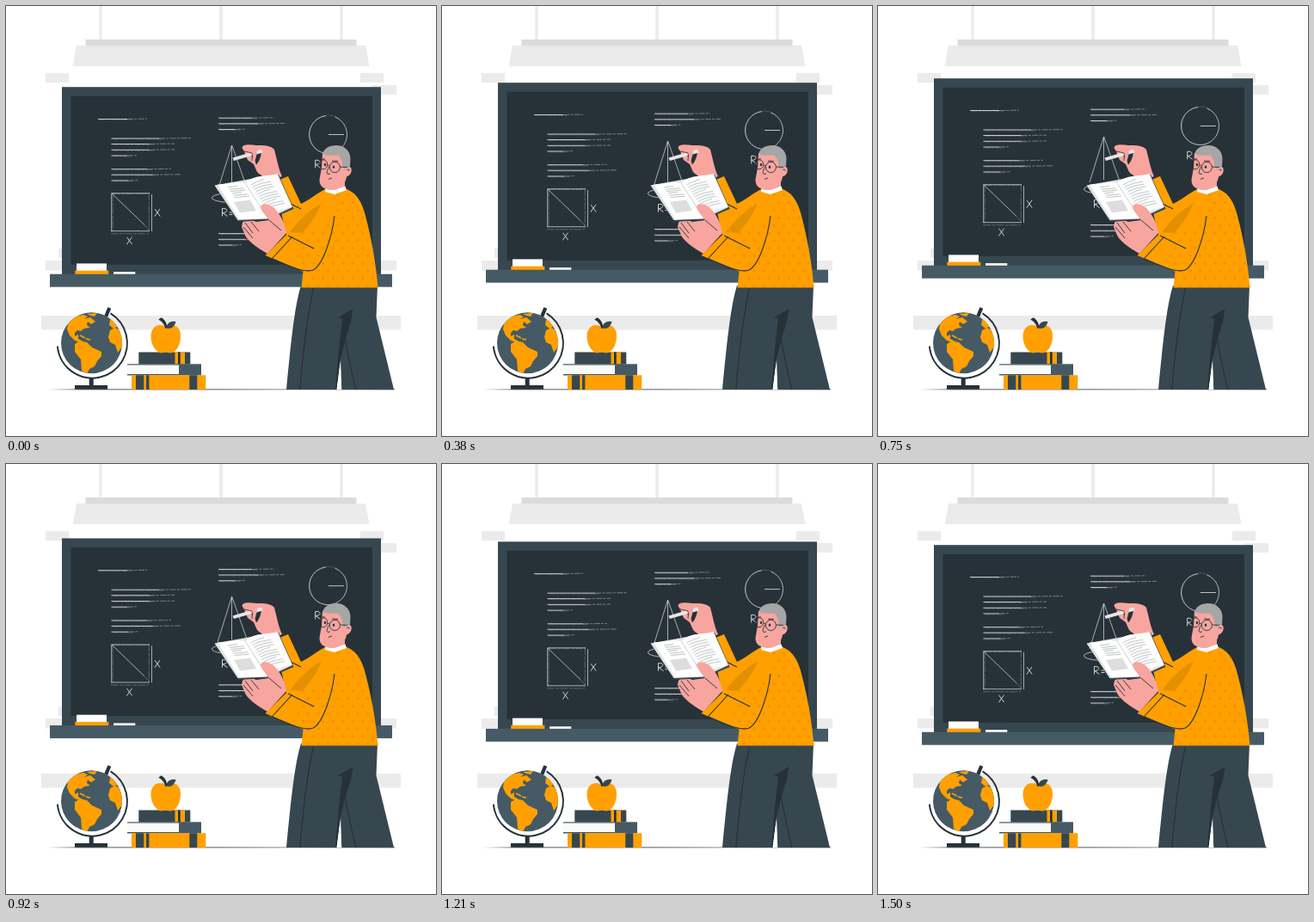
Write an HTML page with a canvas that moves like this. It is 500x500 px and loops after 1540 ms.

```html
<!DOCTYPE html>
<html lang="en">
<head>
<meta charset="utf-8">
<title>Mathematics lesson</title>
<style>
  html, body { margin: 0; width: 100%; height: 100%; overflow: hidden; background: #fff; }
  canvas { display: block; width: 500px; height: 500px; }
</style>
</head>
<body>
<canvas id="stage" width="500" height="500"></canvas>
<script>
const ctx = document.getElementById('stage').getContext('2d');
const INK = '#263238', SLATE = '#37474f', STEEL = '#455a64', ORANGE = '#ffa000';
const SKIN = '#f8a59f', WALL = '#ebebeb', CHALK = '#d0d5d7';
const LOOP = 1540, FPS = 24, CYCLE = 1.5, LIFT = 10;

function box(color, x, y, w, h) {
  ctx.fillStyle = color;
  ctx.fillRect(x, y, w, h);
}
function fill(color, d) {
  ctx.fillStyle = color;
  ctx.fill(new Path2D(d));
}
function line(color, width, d) {
  ctx.strokeStyle = color;
  ctx.lineWidth = width;
  ctx.stroke(new Path2D(d));
}
function disc(color, x, y, rx, ry = rx) {
  ctx.fillStyle = color;
  ctx.beginPath();
  ctx.ellipse(x, y, rx, ry, 0, 0, 7);
  ctx.fill();
}
function ring(color, width, x, y, rx, ry = rx, from = 0, to = Math.PI * 2) {
  ctx.strokeStyle = color;
  ctx.lineWidth = width;
  ctx.beginPath();
  ctx.ellipse(x, y, rx, ry, 0, from, to);
  ctx.stroke();
}

function drawWall() {
  for (const x of [108.3, 248.3, 388.3]) box(WALL, x, 0, 3.5, 40);
  fill(WALL, 'M82 46H418L422.5 70H77.500Z');
  box('#dbdbdb', 92.5, 39, 315, 7.2);
  box(WALL, 46, 78, 27, 11);
  box(WALL, 412, 78, 27, 11);
  box(WALL, 426, 92, 28, 11);
  box(WALL, 61, 282, 28, 11);
  box(WALL, 46, 296, 28, 11.5);
  box(WALL, 426, 296, 28, 11.5);
  box(WALL, 41, 360, 418, 16.5);
}

// A chalk stroke that breaks up and thins out towards its end.
function chalkLine(x1, y, x2) {
  const mid = x1 + (x2 - x1) * 0.6;
  line(CHALK, 0.95, `M${x1} ${y}H${mid}`);
  ctx.setLineDash([7, 1.2, 3, 1.5]);
  ctx.globalAlpha = 0.35;
  line(CHALK, 0.6, `M${x1 + 2} ${y + 0.9}H${mid + 6}`);
  ctx.globalAlpha = 0.65;
  line(CHALK, 0.7, `M${mid} ${y}L${x2} ${y - 0.4}`);
  ctx.setLineDash([]);
  ctx.globalAlpha = 1;
}
function letterX(x, y) {
  line(CHALK, 0.95, `M${x - 3} ${y - 4.2}L${x + 3.2} ${y + 4.2}M${x + 3} ${y - 4.4}L${x - 3.2} ${y + 4.4}`);
}
function letterR(x, y) {
  line(CHALK, 1, `M${x} ${y + 9}V${y}C${x + 7} ${y - 1} ${x + 7} ${y + 5} ${x + 0.5} ${y + 5}L${x + 6} ${y + 9}M${x + 8} ${y + 4.5}h4M${x + 8} ${y + 7}h4`);
}

function drawBoard(dy) {
  ctx.save();
  ctx.translate(0, dy);
  box(SLATE, 65, 94.2, 371, 218);
  box(INK, 75.5, 104.7, 350.5, 196);
  box(STEEL, 51, 311.7, 398, 15);

  box('#fff', 82, 299.4, 35, 9);
  box(ORANGE, 80.3, 307.6, 39, 4.2);
  box('#fff', 125, 309.1, 25.3, 2.6);

  const lines = [
    [107, 131.5, 164], [122.5, 154, 215], [122.5, 160.5, 196], [122.5, 167.3, 196],
    [122.5, 174, 153], [122.5, 189.7, 192], [122.5, 196.2, 203], [122.5, 203, 155],
    [247, 130.2, 312], [247, 136.8, 324], [247, 143.5, 279],
    [247, 264.6, 300], [247, 271.3, 300], [247, 278, 274]
  ];
  for (const l of lines) chalkLine(...l);

  line(CHALK, 0.75, 'M122.700 262V217.700H167M123 218L161 254.500M122 261.700H167M169.500 219V262');
  ctx.globalAlpha = 0.45;
  ctx.setLineDash([9, 1.5, 4, 1]);
  line(CHALK, 0.7, 'M124 218V262M166.300 217V262M122 264.800H166M124 218.500H167M161 254.500L166 260');
  ctx.setLineDash([]);
  ctx.globalAlpha = 1;
  letterX(176, 240.3);
  letterX(143.5, 273);

  line(CHALK, 0.75, 'M262.500 162L246 215M262.500 162V212M262.700 162L281 214');
  ring(CHALK, 0.8, 263, 223, 23.5, 5.5);
  letterR(251.5, 235.5);

  ring(CHALK, 0.8, 374.5, 149.5, 22, 22, -1.2, 4.6);
  ctx.globalAlpha = 0.35;
  ring(CHALK, 0.6, 374.8, 149.2, 21.6, 22.3, 1, 5.3);
  ctx.globalAlpha = 1;
  line(CHALK, 0.9, 'M375 149.500H393');
  letterR(359.7, 179.3);
  ctx.restore();
}

function drawGround() {
  const g = ctx.createLinearGradient(47, 0, 452, 0);
  g.addColorStop(0, 'rgba(38,50,56,0)');
  g.addColorStop(0.1, INK);
  g.addColorStop(0.5, INK);
  g.addColorStop(0.7, 'rgba(38,50,56,.65)');
  g.addColorStop(1, INK);
  box(g, 47, 445.5, 405, 0.8);
}

function drawGlobe() {
  ring(INK, 2, 100.3, 392, 40.6, 40.6, -1.02, 3.05);
  line(INK, 4.2, 'M120.300 351L116.200 361');
  box(INK, 96.7, 432, 5, 10);
  box(INK, 80, 441, 38, 4.8);
  disc(STEEL, 99.5, 391.8, 35.5);
  ctx.save();
  ctx.beginPath();
  ctx.arc(99.5, 391.8, 35.5, 0, 7);
  ctx.clip();
  fill(ORANGE, 'M72 369L81 361L90 359L95 361L91 364L98 362L104 367L99 370L95 367L94 371L98 374L91 375L87 378L83 377L80 380L80 384L84 382L84 387L91 391L88 392L80 389L74 383L71 376Z');
  fill(ORANGE, 'M94 358L106 357L103 361L98 360Z');
  fill(ORANGE, 'M80 393L86 389.500L94 391L100 397L111 402L111 407L106 413L103 419L97 422L94 428L88 424L87 411L80 402Z');
  fill(ORANGE, 'M121 365L128 362L136 375L135 378L129 373L125 375L120 371Z');
  fill(ORANGE, 'M121 377L127 374L136 379L136 395L130 403L127 394L121 391L119 385Z');
  line(ORANGE, 1.4, 'M86 383L92 386M93 387L98 388');
  ctx.restore();
}

function drawBooks() {
  box(SLATE, 154.3, 402.5, 60, 14);
  box(ORANGE, 196.5, 402.5, 3.5, 14);
  box(ORANGE, 202.5, 402.5, 5.5, 14);
  box(INK, 200, 402.5, 2.5, 14);
  box(STEEL, 141, 416.3, 86, 13.2);
  box('#fafafa', 141, 417.5, 60, 10.5);
  box(ORANGE, 146, 429.3, 86.3, 16.7);
  box(SLATE, 151, 429.3, 9.3, 16.7);
  box(SLATE, 163, 429.3, 3.4, 16.7);
  box(SLATE, 213.3, 429.3, 9, 16.7);

  fill(ORANGE, 'M186 373.500C193 368 203.500 372 203 384C203 395 197 403.500 191 403.500C188 403.500 187 402 186 402C184 402 183 403.500 180 403.500C174 402 168.500 394 168.500 384C168.500 372 179 368 186 373.500Z');
  fill(INK, 'M177.300 364.500L180.500 362.300C184 364 187 368 187.500 374.500L185.300 375C184 369 181 367 177.300 364.500Z');
  fill(SLATE, 'M186.500 374C187 368 192 366 197.500 367C196 373 191 377 186.500 374Z');
}

function drawTrousers() {
  fill(SLATE, 'M343 325C335 350 330.500 400 326 446H384L389 408L390 446H451L430.500 362L432 325Z');
  fill(INK, 'M385.500 362.500L403.500 352L401 367L395 386L389.500 408L384.500 446H383L387 399L391 363Z');
  fill('#fff', 'M388.600 414L390.300 446H384.700Z');
  line(INK, 1.2, 'M357.500 328C349 366 345 407 341.800 446M394 386C398 407 402 428 407 446');
}

const SWEATER = 'M371 213C363 217 352 226 343 230L328 198L314.500 203.500C317 222 321 248 326 266L301.500 290L345.500 308.500L343.500 327.500H432.500C430 299 425.500 274 419.500 250C415 229 408 216 393 212Z';

function drawSweater() {
  fill(ORANGE, SWEATER);
  ctx.save();
  ctx.clip(new Path2D(SWEATER));
  fill('#e39000', 'M330 263C339 251 352 237 367 229.500C361 244 352 256 344 264Z');
  for (let row = 0; row < 13; row++) {
    for (let col = 0; col < 9; col++) {
      const x = 340 + col * 11.5 + (row % 2) * 5.75;
      const y = 220 + row * 8.8;
      if (x > 378 - (y - 240) * 0.3 || y > 262) disc('#ee9500', x, y, 1.7);
    }
  }
  ctx.restore();
  line(INK, 1.1, 'M382 244C379 268 369 301 357 307C347 311 326 301 309 293.500M328 267L358 282M310 293L333 268M319 209L327 228L343 236');
}

function drawHead() {
  fill(SKIN, 'M373 203H394V212L383 217L371 214Z');
  fill('#fff', 'M372 211L382 214L394.500 209.500L396 214L382 219L371 216Z');
  fill(SKIN, 'M368 171L392 168L397 187C404 185 403 197 396 198.500C395 207 388 214 378 214C367 213 363 207 365 199L367 188Z');
  fill('#a6a6a6', 'M368.500 172C369 166 376 162 384 162C393 162 400 168 400.500 177L400 187C397 186 395 188 393.500 190L391.500 188C392 181 389 176 386 173.500C379 174 372 174 368.500 172Z');
  ring(INK, 0.9, 369, 184.3, 4.8, 5.5);
  ring(INK, 0.9, 382.4, 187.5, 6, 6.2);
  disc(INK, 371, 184.5, 1.2, 1.7);
  disc(INK, 381, 187.3, 1.2, 1.7);
  line(INK, 0.9, 'M374 185L376.200 186M388.500 187L397 187.500M366 178L371 178M379 180L386 180.500M375.500 187C374 191 372 194 374 195.500L377 195M375 201.500L379 200M396 191C398 189 399 190 399 192');
}

function drawWritingHand() {
  fill(SKIN, 'M274.500 165C275 160 284 161 291 162C300 161.500 309 162.500 312 167C315 178 317 190 321 198L308.500 204C301 199 296 197 292 193L288 184L281 179L277 169Z');
  fill(INK, 'M284 173L297 170C296 177 294 181 291 184.500L289.500 180Z');
  fill('#e6e6e6', 'M263.500 176.500L297 166.500L298.500 170.500L264.800 180Z');
  fill(SKIN, 'M276 163.500L288 165L292 168C292 173 290 177 289 182L286 180C287 176 287 173 286 171L277 168.500Z');
  line(INK, 0.8, 'M277 168.800L286 171C287 174 286 177 286 180');
}

function drawReadingHand() {
  fill(SKIN, 'M275 252C278 247 285 249 291 251L306 249C302 243 297 238 296 233C298 227 306 231 311 235C319 242 324 253 326 264L304 288C292 281 279 272 277 264L274 257Z');
}

function drawOpenBook() {
  fill(SLATE, 'M242.500 209L270 251L304 249L334.500 236L317 196L279 207Z');
  fill('#e2e2e2', 'M242.500 208.500L269.500 249L304 247.500L333 234L316 195.500Z');
  fill('#fff', 'M246 207.500C257 208 269 203 278 206L304.500 247L271 248Z');
  fill('#fcfcfc', 'M278 206C289 195 304 199 315 195L332.500 233C321 237 312 239 304.500 247Z');
  fill('#ddd', 'M265 228L284 225.500L291 238L272 240.500Z');
  for (let i = 0; i < 6; i++) {
    const x = 258 + i * 1.6, y = 211 + i * 2.3;
    line('#9aa2a6', 0.65, `M${x} ${y}l${i % 3 ? 17 : 11} -1.500`);
  }
  for (let i = 0; i < 11; i++) {
    const x = 285 + i * 1.8, y = 208 + i * 2.8;
    line('#9aa2a6', 0.6, `M${x} ${y}C${x + 6} ${y - 4} ${x + 12} ${y - 5} ${x + (i % 4 ? 21 : 15)} ${y - 6.5}`);
  }
  line('#c5c9cb', 0.8, 'M278 206L304.500 247');
  // The thumb overlaps the page edge.
  fill(SKIN, 'M296 234C297 228 306 230 312 235C319 242 324 253 326 264L315 265L306 249C302 243 297 239 296 234Z');
  line(INK, 0.9, 'M306 249L320 261M278 252L287 264M285 251L294 262M276 257L287 270');
}

function drawTeacher() {
  drawTrousers();
  drawSweater();
  drawWritingHand();
  drawReadingHand();
  drawOpenBook();
  drawHead();
}

// The picture advances at 24 steps a second, timed in hundredths.
function boardOffset(ms) {
  const step = Math.floor((Math.floor(ms / 10) + 0.499) * FPS / 100);
  const phase = (step / FPS / CYCLE) % 1;
  return -LIFT * (1 - Math.abs(1 - 2 * phase));
}

const start = performance.now();
function render() {
  const ms = (performance.now() - start) % LOOP;
  box('#fff', 0, 0, 500, 500);
  drawWall();
  drawBoard(boardOffset(ms));
  drawGround();
  drawGlobe();
  drawBooks();
  drawTeacher();
  requestAnimationFrame(render);
}
render();
</script>
</body>
</html>
```
